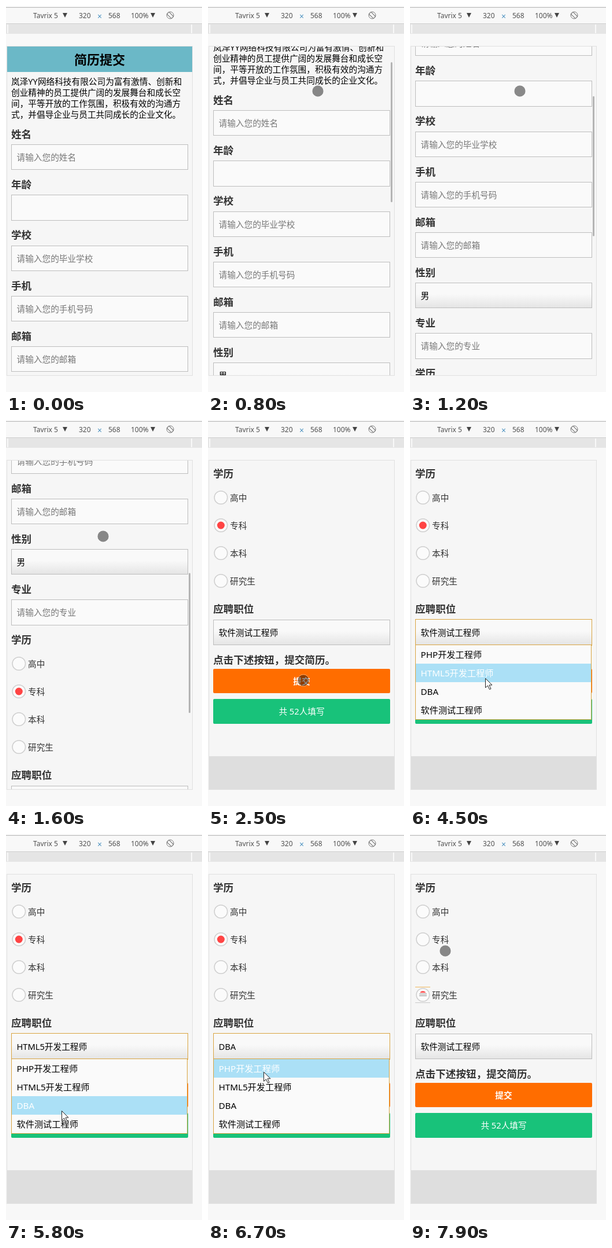
An HTML page with a canvas that plays this animation: 339x667 px, repeating every 8000 ms.

```html
<!DOCTYPE html>
<html lang="zh-CN">
<head>
<meta charset="utf-8">
<title>简历提交</title>
<style>
html, body { margin: 0; width: 100%; height: 100%; overflow: hidden; background: #f8f8f8; }
canvas { display: block; }
</style>
</head>
<body>
<canvas id="stage" width="339" height="667"></canvas>
<script>
const ctx = document.getElementById('stage').getContext('2d');
const LOOP = 8000, STEP = 100;
const BASE = 14.667;                       // body font size
const FONT = '"Noto Sans", "Noto Sans CJK SC", "Noto Sans CJK", sans-serif';
const GOLD = '#d9a441', GREY = '#bdbdbd';
const VIEW = { x: 2, y: 70, w: 320, h: 568 };
const LEFT = 9, WIDTH = 306, MID = 162;
const PITCH = 87.2, BOX_H = 44.25, GAP = 18.15, RADIO_STEP = 48;
const MAX_SCROLL = 739;
const MENU_TOP = 388, ROW_H = 32;

const INTRO = [
  '岚泽YY网络科技有限公司为富有激情、创新和',
  '创业精神的员工提供广阔的发展舞台和成长空',
  '间，平等开放的工作氛围，积极有效的沟通方',
  '式，并倡导企业与员工共同成长的企业文化。'
];
const FIELDS = [
  { name: '姓名', hint: '请输入您的姓名' },
  { name: '年龄', hint: '' },
  { name: '学校', hint: '请输入您的毕业学校' },
  { name: '手机', hint: '请输入您的手机号码' },
  { name: '邮箱', hint: '请输入您的邮箱' },
  { name: '性别', value: '男' },
  { name: '专业', hint: '请输入您的专业' }
];
const DEGREES = ['高中', '专科', '本科', '研究生'];
const JOBS = ['PHP开发工程师', 'HTML5开发工程师', 'DBA', '软件测试工程师'];

// Each visit to the job menu: when it opens, is hovered and closes
const PICKS = [
  { row: 1, open: 3700, hover: 4500, shut: 4800, x: 130 },
  { row: 2, open: 5500, hover: 5800, shut: 6100, x: 96 },
  { row: 3, open: 6600, hover: 6900, shut: 7100, x: 96 }
];
const PRESS = 2800, RELEASE = 3300, FOCUS = PICKS[0].open, BLUR = 7700;

// Pointer stops: arrival time and place
const STOPS = [
  [200, 196, 190], [800, 190, 147], [1600, 168, 201], [1900, 165, 357],
  [2500, 165, 450], [3100, 188, 500],
  ...PICKS.flatMap(p => [
    [p.open - 200, p.x, MENU_TOP - 12],
    [p.hover, p.x, MENU_TOP + 26 + ROW_H * p.row]
  ]),
  [7400, 28, 276], [7900, 61, 202]
];

const clamp = v => Math.min(1, Math.max(0, v));
const smooth = k => k * k * (3 - 2 * k);
const scrollAt = t => MAX_SCROLL * clamp((t - 82) / 1818) ** 2.721;

function pointerAt(t) {
  let [, x, y] = STOPS[0];
  for (const [at, sx, sy] of STOPS) {
    const k = smooth(clamp((t - at + 300) / 300));
    x += (sx - x) * k;
    y += (sy - y) * k;
  }
  return [x, y];
}

function rect(x, y, w, h, fill) {
  ctx.fillStyle = fill;
  ctx.fillRect(x, y, w, h);
}

function round(x, y, w, h, r, fill) {
  ctx.beginPath();
  ctx.roundRect(x, y, w, h, r);
  ctx.fillStyle = fill;
  ctx.fill();
}

function frame(x, y, w, h, color) {
  ctx.strokeStyle = color;
  ctx.lineWidth = 1;
  ctx.strokeRect(x + .5, y + .5, w - 1, h - 1);
}

function disc(x, y, r, fill) {
  ctx.beginPath();
  ctx.arc(x, y, r, 0, Math.PI * 2);
  ctx.fillStyle = fill;
  ctx.fill();
}

function ring(x, y, r, color, width = 1) {
  ctx.beginPath();
  ctx.arc(x, y, r, 0, Math.PI * 2);
  ctx.strokeStyle = color;
  ctx.lineWidth = width;
  ctx.stroke();
}

// y is the visual centre of the line
function text(str, x, y, color = '#000', size = BASE, weight = 400, align = 'left') {
  ctx.font = `${weight} ${size}px ${FONT}`;
  ctx.textAlign = align;
  ctx.fillStyle = color;
  ctx.fillText(str, x, Math.round(y + size * .4));
}

const label = (str, y) => text(str, LEFT, y, '#333', BASE * 1.2, 700);

// One labelled box; a value makes it a select, a hint a text input
function field({ name, hint, value }, y, focus) {
  const top = Math.round(y + GAP), h = Math.round(y + GAP + BOX_H) - top;
  label(name, y);
  let fill = '#fafafa';
  if (value) {
    fill = ctx.createLinearGradient(0, top, 0, top + h);
    fill.addColorStop(.45, '#f9f9f9');
    fill.addColorStop(1, '#e4e4e4');
  }
  rect(LEFT, top, WIDTH, h, fill);
  if (focus) frame(LEFT, top - 1, WIDTH, h + 2, GOLD);
  else frame(LEFT, top, WIDTH, h, GREY);
  text(value || hint, LEFT + 9.5, top + 22, value ? '#000' : '#777');
}

function button(y, h, fill, str, weight) {
  round(LEFT, y, WIDTH, h, 2, fill);
  text(str, MID, y + h / 2, '#fff', BASE, weight, 'center');
}

function caret(x) {
  ctx.beginPath();
  ctx.moveTo(x, 12);
  ctx.lineTo(x + 8, 12);
  ctx.lineTo(x + 4, 20);
  ctx.fillStyle = '#444';
  ctx.fill();
}

function toolbar() {
  rect(0, 0, 339, 667, '#f8f8f8');
  rect(0, 2, 339, 1, '#b4b4b4');
  rect(0, 30, 339, 1, '#cfcfcf');
  rect(0, 31, 339, 17, '#e5e5e5');
  for (const x of [VIEW.x, VIEW.x + VIEW.w - 2]) rect(x, 32, 2, 15, '#f8f8f8');
  const item = (s, x) => text(s, x, 16.5, '#505050', 12);
  item('Tavrix 5', 47);
  item('320', 126);
  item('568', 177);
  item('100%', 216);
  caret(98);
  caret(250);
  text('×', MID, 17.5, '#4a90c0', 14, 400, 'center');
  ctx.save();
  ctx.translate(284, 16);
  ring(0, 0, 6, '#777');
  ctx.rotate(-Math.PI / 4);
  round(-3, -6, 6, 12, 1, '#f8f8f8');
  frame(-3, -6, 6, 12, '#666');
  ctx.restore();
}

function radios(y, blurred) {
  const x = 22.3;
  DEGREES.forEach((name, i) => {
    const cy = y + i * RADIO_STEP;
    disc(x, cy, 11.3, '#fbfbfb');
    ring(x, cy, 11.3, '#cfcfcf', 1.5);
    if (i === 1 && !blurred) disc(x, cy, 6.5, '#ff4444');
    text(name, 38, cy + .5, '#333');
  });
  if (!blurred) return;
  // newly chosen radio, its dot only half drawn
  const cy = y + 3 * RADIO_STEP;
  ctx.beginPath();
  ctx.arc(x, cy, 6.5, Math.PI * 1.2, Math.PI * 1.8);
  ctx.fillStyle = '#ff4444';
  ctx.fill();
  for (const dy of [-2, 1]) rect(16, cy + dy, 13, 1, '#888');
  rect(LEFT, cy - 14, 26, 1, '#efb65a');
  rect(LEFT, cy + 13, 26, 1, '#c9c9c9');
}

function menu(row) {
  rect(LEFT, MENU_TOP, WIDTH - 1, ROW_H * JOBS.length + 2, '#fafafa');
  frame(LEFT, MENU_TOP, WIDTH - 1, ROW_H * JOBS.length + 2, GOLD);
  JOBS.forEach((job, i) => {
    const y = MENU_TOP + 1 + i * ROW_H;
    if (i === row) rect(LEFT + 1, y, WIDTH - 3, ROW_H, '#abe0f6');
    text(job, LEFT + 9.5, y + ROW_H / 2, i === row ? '#fff' : '#000', 15.2);
  });
}

function arrow(x, y) {
  const pts = [[0, 0], [0, 16], [4, 12.5], [7, 19], [9.5, 18], [6.5, 11.5], [11.5, 11.5]];
  ctx.beginPath();
  pts.forEach(([a, b]) => ctx.lineTo(x + a + .5, y + b + .5));
  ctx.closePath();
  ctx.fillStyle = '#fff';
  ctx.fill();
  ctx.strokeStyle = '#222';
  ctx.lineWidth = 1;
  ctx.stroke();
}

function page(t) {
  rect(VIEW.x, VIEW.y, VIEW.w, 44, '#6bb8c7');
  text('简历提交', MID, VIEW.y + 22, '#000', BASE * 1.5, 700, 'center');
  INTRO.forEach((line, i) => text(line, LEFT, 130 + i * 19));

  let y = 221;
  for (const f of FIELDS) {
    field(f, y);
    y += PITCH;
  }
  label('学历', y);
  radios(Math.round(y + 41.5), t >= BLUR);

  y += 42 + DEGREES.length * RADIO_STEP;
  const picked = PICKS.filter(p => t >= p.shut).pop();
  const value = JOBS[picked ? picked.row : 3];
  field({ name: '应聘职位', value }, y, t >= FOCUS && t < BLUR);
  label('点击下述按钮，提交简历。', y + PITCH);

  y = Math.round(y + PITCH + 16.5);
  button(y, 42, t >= PRESS && t < RELEASE ? '#f06600' : '#ff6d00', '提交', 700);
  button(y + 52, 43, '#18c27a', '共 52人填写', 400);
  rect(VIEW.x, y + 151, VIEW.w, 58, '#dedede');
}

function draw(t) {
  const scroll = scrollAt(t), [px, py] = pointerAt(t);
  const open = PICKS.some(p => t >= p.open && t < p.shut);
  const { x, y, w, h } = VIEW;
  toolbar();
  rect(x - 1, y - 1, w + 2, h + 2, '#e0e0e0');
  rect(x, y, w, h, '#f6f6f6');

  ctx.save();
  ctx.beginPath();
  ctx.rect(x, y, w, h);
  ctx.clip();
  ctx.save();
  ctx.translate(0, -Math.round(scroll));
  page(t);
  ctx.restore();

  if (scroll > 1) {
    ctx.globalAlpha = clamp((2500 - t) / 500);
    round(316, y + 2 + scroll * .425, 3, 242, 1.5, '#b4b4b4');
    ctx.globalAlpha = 1;
  }
  const over = open && py > MENU_TOP;
  if (open) menu(over ? Math.floor((py - MENU_TOP - 1) / ROW_H) : -1);
  if (over) {
    arrow(px, py);
  } else if (t >= STOPS[0][0]) {
    disc(px, py, 9.7, 'rgba(0,0,0,.45)');
    ring(px, py, 10.2, 'rgba(255,255,255,.4)');
  }
  ctx.restore();
}

function tick() {
  const t = performance.now() % LOOP;
  draw(Math.floor(t / STEP) * STEP);
  requestAnimationFrame(tick);
}
tick();
</script>
</body>
</html>
```
